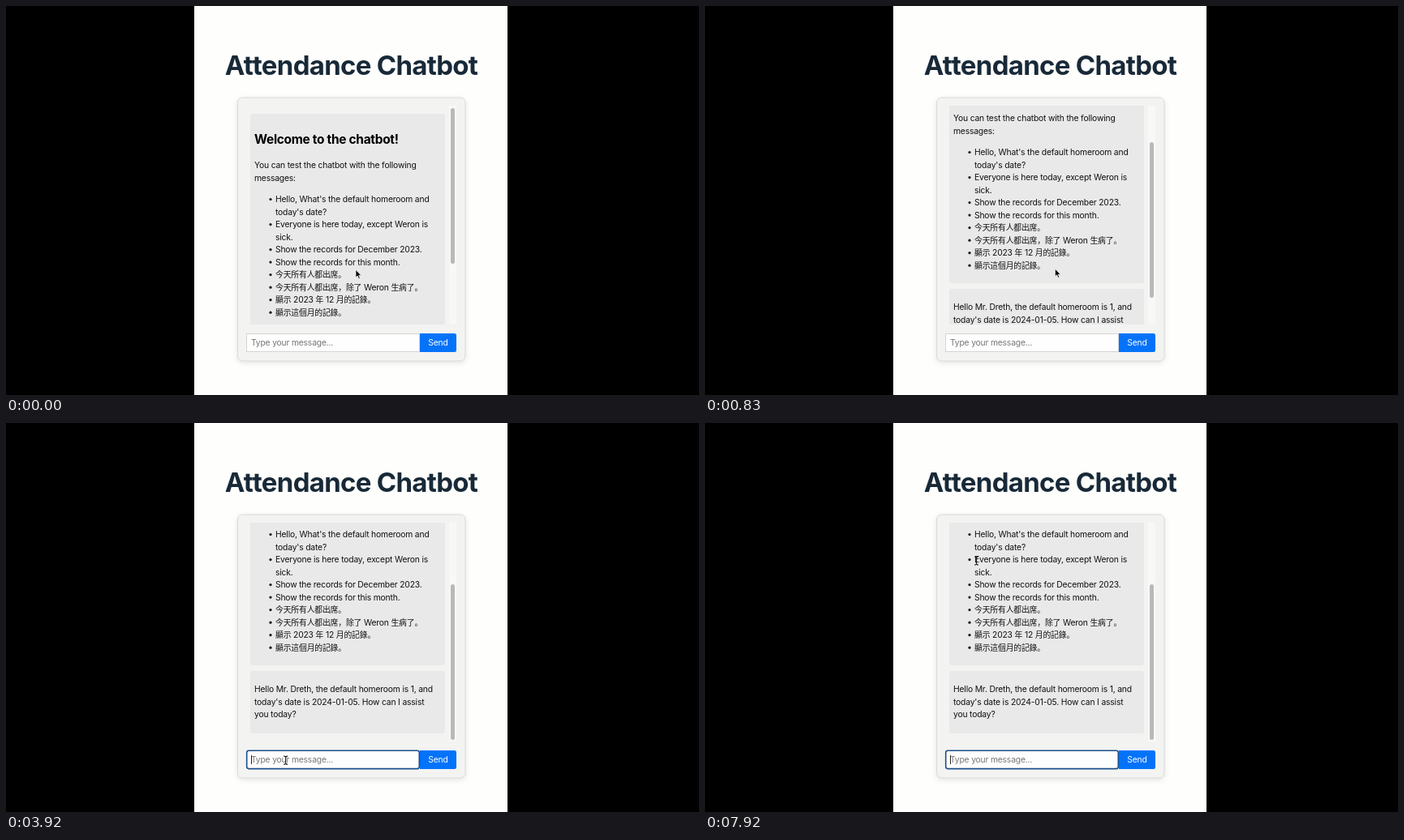
An HTML page for the animation above (8000 ms loop, 854x480 px).

```html
<!DOCTYPE html>
<html lang="en">
<head>
<meta charset="utf-8">
<title>Attendance Chatbot</title>
<style>
  html, body { margin: 0; width: 100%; height: 100%; overflow: hidden; background: #000; }
  svg { display: block; width: 100vw; height: 100vh; }
  text { font: 10.34px Inter, "Noto Sans CJK SC", "Noto Sans CJK", sans-serif; letter-spacing: -.018em; fill: #111; }
  .title { font-size: 33px; font-weight: 700; letter-spacing: -.0215em; fill: #182938; }
  .heading { font-size: 15.5px; font-weight: 700; letter-spacing: -.021em; fill: #000; }
  .han { font-size: 9.85px; }
  .box { fill: #f3f3f2; stroke: #dadad8; filter: drop-shadow(0 2px 3px rgba(0, 0, 0, .1)); }
  .message { fill: #e9e9e9; }
</style>
</head>
<body>
<svg viewBox="0 0 854 480">
  <clipPath id="viewport"><rect x="295" y="123" width="260" height="270"/></clipPath>
  <rect x="232" width="386" height="480" fill="#fefefc"/>
  <text class="title" x="425.5" y="85" text-anchor="middle">Attendance Chatbot</text>
  <rect class="box" x="285.5" y="113" width="280.5" height="325" rx="6"/>

  <g clip-path="url(#viewport)">
    <g id="content">
      <rect class="message" x="301" y="133" width="240" height="267" rx="3"/>
      <rect class="message" x="301" y="407" width="240" height="77" rx="3"/>
      <text class="heading" x="306" y="169.7">Welcome to the chatbot!</text>
    </g>
    <rect x="546" y="123" width="9" height="270" fill="#f8f8f7"/>
    <rect id="thumb" x="548" y="126" width="5" height="192" rx="2.5" fill="#b9b9b9"/>
  </g>

  <path d="M510 404h42.500a2.500 2.500 0 0 1 2.500 2.500v18a2.500 2.500 0 0 1-2.500 2.500H510z" fill="#0473fa"/>
  <rect id="field" fill="#fefefe"/>
  <text x="302" y="419" style="fill:#767676">Type your message...</text>
  <text x="532.5" y="419.300" text-anchor="middle" style="fill:#fff">Send</text>
  <path id="caret" d="M302.500 410v11" stroke="#222"/>

  <path id="arrow" d="M0 0V9.500L2.200 7.500 3.700 11 5.300 10.300 3.800 6.900H6.800Z" fill="#000" stroke="#fff" stroke-width=".7"/>
  <path id="beam" d="M-2.500-5Q0-5 0-3.500Q0-5 2.500-5M0-4V4M-2.500 5Q0 5 0 3.500Q0 5 2.500 5" fill="none" stroke="#1c1c1c" stroke-width="1.100"/>
</svg>
<script>
const LOOP = 8000, LINE = 15.52, MAX_SCROLL = 101, FOCUS_AT = 2575, BEAM_AT = 2130;
const byId = id => document.getElementById(id);
const content = byId('content');

function add(tag, attrs, markup = '') {
  const node = document.createElementNS(content.namespaceURI, tag);
  for (const key in attrs) node.setAttribute(key, attrs[key]);
  node.innerHTML = markup;
  content.append(node);
}

function addLines(x, baseline, lines) {
  lines.forEach((line, i) => {
    const y = baseline + i * LINE;
    if (line.startsWith('*')) add('circle', { cx: 326, cy: y - 3.5, r: 1.6, fill: '#111' });
    const markup = line.replace('*', '').replace(/[\u3000-\uffff]+/g, '<tspan class="han">$&</tspan>');
    add('text', { x, y }, markup);
  });
}

addLines(306, 200.2, ['You can test the chatbot with the following', 'messages:']);
addLines(332, 242, [
  "*Hello, What's the default homeroom and",
  "today's date?",
  '*Everyone is here today, except Weron is',
  'sick.',
  '*Show the records for December 2023.',
  '*Show the records for this month.',
  '*今天所有人都出席。',
  '*今天所有人都出席，除了 Weron 生病了。',
  '*顯示 2023 年 12 月的記錄。',
  '*顯示這個月的記錄。'
]);
addLines(306, 433.3, [
  'Hello Mr. Dreth, the default homeroom is 1, and',
  "today's date is 2024-01-05. How can I assist",
  'you today?'
]);

const smooth = p => p * p * (3 - 2 * p);

// Keys are [time, ...values], eased between neighbours.
function sample(keys, t) {
  const next = keys.findIndex(key => key[0] > t);
  if (next < 0) return keys.at(-1).slice(1);
  const [from, to] = [keys[next - 1], keys[next]];
  const ease = smooth((t - from[0]) / (to[0] - from[0]));
  return from.slice(1).map((v, i) => v + (to[i + 1] - v) * ease);
}

const scrollKeys = [[0, 0], [440, 0], [1150, MAX_SCROLL]];
const pointerKeys = [
  [0, 431, 325.5], [1150, 431.5, 324], [1670, 401.5, 382.5],
  [2300, 346, 417], [3000, 346, 417], [4200, 344.5, 416], [5450, 344.5, 416],
  [6300, 355.5, 157], [6800, 355.5, 157], [7550, 334.5, 170]
];

function setAttrs(id, attrs) {
  for (const key in attrs) byId(id).setAttribute(key, attrs[key]);
}

function draw(now) {
  const t = now % LOOP;
  const scroll = Math.round(sample(scrollKeys, t)[0]);
  const focused = t >= FOCUS_AT;
  const beam = t >= BEAM_AT;
  const transform = `translate(${sample(pointerKeys, t)})`;

  setAttrs('content', { transform: `translate(0 ${-scroll})` });
  setAttrs('thumb', { y: 126 + scroll * 73 / MAX_SCROLL });
  setAttrs('field', focused
    ? { x: 296.7, y: 404.2, width: 212.6, height: 22.4, rx: 2.5, stroke: '#1b4f8a', 'stroke-width': 1.6 }
    : { x: 296.5, y: 404.5, width: 213, height: 22, rx: 0, stroke: '#d4d4d4', 'stroke-width': 1 });
  setAttrs('caret', { opacity: +(focused && (t - 2490) % 1000 < 500) });
  setAttrs('arrow', { transform, opacity: +!beam });
  setAttrs('beam', { transform, opacity: +beam });
  requestAnimationFrame(() => draw(performance.now() - start));
}

const start = performance.now();
draw(0);
</script>
</body>
</html>
```
